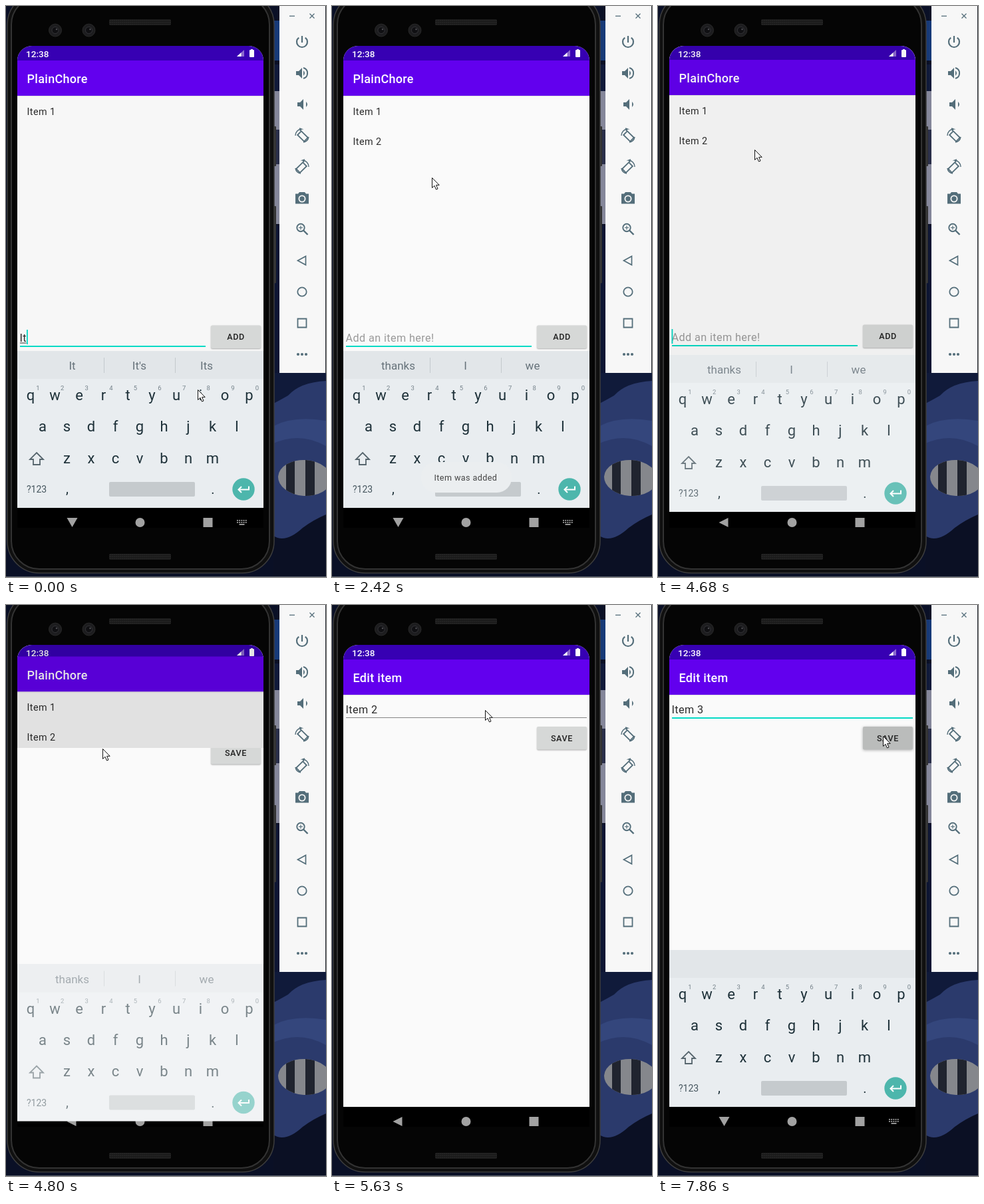
An HTML page with a canvas that plays this animation: 481 by 859 pixels, repeating every 8 s.

```html
<!DOCTYPE html>
<html lang="en">
<head>
<meta charset="utf-8">
<title>Todo app demo</title>
<style>
  html, body { margin: 0; width: 100%; height: 100%; overflow: hidden; background: #0a1026; }
  canvas { display: block; width: 481px; height: 859px; }
</style>
</head>
<body>
<canvas id="stage" width="481" height="859"></canvas>
<script>
const c = document.getElementById('stage').getContext('2d');
const LOOP = 8000;
const TEAL = '#03dac5', SLATE = '#546e7a', PAPER = '#fafafa';

// Stepped tracks: [time, value...], held until the next entry.
const pointer = [
  [0, 288, 577], [820, 300, 560], [940, 325, 521], [1060, 336, 500], [1490, 338, 498],
  [2030, 357, 445], [2160, 290, 372], [2280, 204, 314], [2420, 150, 258], [2540, 108, 222],
  [2660, 82, 204], [2780, 69, 192], [2900, 64, 198], [3050, 67, 202], [3170, 68, 200],
  [3320, 73, 200], [3470, 66, 200], [3890, 110, 208], [4010, 145, 216], [5350, 198, 200],
  [5480, 252, 182], [5630, 230, 158], [5990, 212, 168], [6110, 194, 176],
  [7320, 298, 191], [7470, 335, 196], [7590, 338, 197]
];
const entry = [[0, 'It'], [120, 'Item'], [270, 'Item '], [420, 'Item 2'], [1490, '']];
const edited = [[0, 'Item 2'], [6920, 'Item '], [7040, 'Item 3']];
const hints = [
  [0, 'It', "It's", 'Its'], [120, 'Item', 'Items', 'is'], [270, 'is', 'was', 'I'], [420],
  [1760, 'thanks', 'I', 'we'], [6000], [6920, 'is', 'was', 'I'], [7040]
];
const caret = [[0, 1], [940, 0], [1490, 1], [2030, 0], [2540, 1], [2900, 0], [3470, 1]];
const editCaret = [[0, 0], [5870, 1], [6110, 0], [6920, 1], [7470, 0]];
const toast = [[0, 0], [1760, 0.6], [1880, 1], [3590, 0.95], [3740, 0]];
// Keyboard: shown, offset, fade towards the paper colour.
const keys = [[0, 1, 0, 0], [4680, 1, 6, 0.15], [4800, 1, 21.5, 0.42], [4950, 0, 0, 0],
  [6650, 1, 6, 0.12], [6770, 1, 0, 0]];
// List screen: lower clip edge, shift, shade.
const list = [[0, 755, 0, 0], [4680, 620, -1, 0.04], [4800, 215, -4.5, 0.1], [4950, 0, 0, 0]];
const editShift = [[0, 28], [4800, 22], [4950, 3], [5070, 0]];

function at(track, t) {
  let cur = track[0];
  for (const k of track) if (k[0] <= t) cur = k;
  return cur.slice(1);
}

function box(x, y, w, h, fill) {
  c.fillStyle = fill;
  c.fillRect(x, y, w, h);
}

function round(x, y, w, h, r, fill, line, lw = 1) {
  c.beginPath();
  c.roundRect(x, y, w, h, r);
  if (fill) { c.fillStyle = fill; c.fill(); }
  if (line) { c.strokeStyle = line; c.lineWidth = lw; c.stroke(); }
}

function disc(x, y, r, fill, line, lw = 1) {
  c.beginPath();
  c.arc(x, y, r, 0, Math.PI * 2);
  if (fill) { c.fillStyle = fill; c.fill(); }
  if (line) { c.strokeStyle = line; c.lineWidth = lw; c.stroke(); }
}

function shape(d, x, y, fill, line, lw = 1.8, turn = 0) {
  const p = new Path2D(d);
  c.save();
  c.translate(x, y);
  c.rotate(turn);
  if (fill) { c.fillStyle = fill; c.fill(p); }
  if (line) { c.strokeStyle = line; c.lineWidth = lw; c.stroke(p); }
  c.restore();
}

function text(s, x, y, size, fill, { weight = 400, align = 'left', gap = 0 } = {}) {
  c.font = `${weight} ${size}px Roboto, sans-serif`;
  c.letterSpacing = gap + 'px';
  c.textAlign = align;
  c.fillStyle = fill;
  c.fillText(s, x, y);
  return c.measureText(s).width;
}

function wallpaper() {
  box(0, 0, 481, 859, '#0a1026');
  box(402, 22, 9, 60, '#173a78');
  box(402, 88, 9, 40, '#101a3a');
  box(402, 128, 9, 200, '#85879a');
  box(402, 186, 9, 52, '#2a2f4a');
  box(402, 330, 9, 222, '#0d1533');
  box(402, 552, 79, 307, '#2b3a6c');
  shape('M0 0H79V12Q40 14 22 34Q8 42 0 46Z', 402, 552, '#101a3a');
  shape('M0 0Q30 -16 79 -8V30Q40 8 0 26Z', 402, 632, '#34467c');
  shape('M0 110V48Q18 60 44 36Q60 24 79 16V110Z', 402, 749, '#0b1024');
  c.save();
  c.beginPath();
  c.ellipse(449, 710, 40, 27, 0.06, 0, 7);
  c.clip();
  box(402, 680, 79, 60, '#85878c');
  box(421, 680, 13, 60, '#20242f');
  box(450, 680, 14, 60, '#20242f');
  c.restore();
  box(0, 858, 481, 1, '#555b66');
}

function grille(y) {
  round(155, y, 93, 9, 2, '#1b1b1b');
  for (let i = 0; i < 31; i++)
    for (let j = 0; j < 3; j++) box(156 + i * 3, y + 1 + j * 3, 1, 1, '#3a3a3a');
}

function phone() {
  round(402, 181, 4, 60, 1, '#333');
  round(402, 301, 4, 116, 1, '#333');
  round(2, -20, 401, 873, 48, '#101010', '#3d3d3d', 1.5);
  round(8, -14, 388, 861, 42, '#050505', '#333', 2);
  grille(20);
  grille(824);
  for (const x of [74, 124.5]) {
    disc(x, 36.5, 9.5, '#1d1d1f', '#292929');
    disc(x, 36.5, 5, '#101013', '#343438');
    disc(x + 2, 35, 1.3, '#4b4b50');
  }
  box(17, 755, 370, 30, '#000');
}

function toolbar() {
  box(411, 0, 70, 552, '#f7f7f7');
  box(480, 0, 1, 552, '#20242c');
  box(426, 14.5, 8, 1.3, SLATE);
  shape('M-3.5 -3.5L3.5 3.5M3.5 -3.5L-3.5 3.5', 460, 15, null, SLATE, 1.3);
  const x = 445;
  shape('M0 -9V1M-4.8 -6.4A8 8 0 1 0 4.8 -6.4', x, 54, null, SLATE, 2.2);
  const horn = 'M-9 -3H-5L0 -8V8L-5 3H-9Z';
  shape(horn, x, 101, SLATE);
  shape('M2 -4Q6 0 2 4Z', x, 101, SLATE);
  shape('M2 -8A8.3 8.3 0 0 1 2 8', x, 101, null, SLATE, 2);
  shape(horn, x + 2, 148, SLATE);
  shape('M4 -4Q8 0 4 4Z', x + 2, 148, SLATE);
  for (const [y, s] of [[195, 1], [242, -1]]) {
    c.save();
    c.translate(x, y);
    c.scale(s, 1);
    shape('M-4 -7H4V7H-4Z', 1, 1, null, SLATE, 1.9, -Math.PI / 4);
    shape('M-10 0A10 10 0 0 1 -1 -10L-4 -11M-1 -10L-3 -7M10 2A10 10 0 0 1 2 10', 0, 0, null, SLATE, 1.5);
    c.restore();
  }
  shape('M-4 -9H4L6 -6.5H10V8.5H-10V-6.5H-6Z', x, 289, SLATE);
  disc(x, 290, 4.6, null, '#f7f7f7', 1.8);
  disc(x - 2, 333.5, 5.7, null, SLATE, 1.9);
  shape('M2 2.5L8.5 9', x, 335, null, SLATE, 2.4);
  shape('M-3 0H3M0 -3V3', x - 2, 333.5, null, SLATE, 1.2);
  shape('M-6.5 0L5.5 -6.5V6.5Z', x, 383, null, SLATE, 1.7);
  disc(x, 430, 6.7, null, SLATE, 1.8);
  shape('M-6.5 -6.5H6.5V6.5H-6.5Z', x, 477, null, SLATE, 1.8);
  for (const dx of [-6, 0, 6]) disc(x + dx, 524, 2.1, SLATE);
}

function navBar(withKeys) {
  const g = '#a2a2a2';
  shape(withKeys ? 'M-8 -7H8L0 7Z' : 'M-8 0L6 -7V7Z', 99.5, 777, g);
  disc(201.5, 777, 7, g);
  box(296.5, 770, 14, 14, g);
  if (!withKeys) return;
  for (let i = 0; i < 5; i++)
    for (let j = 0; j < 2; j++) box(347 + i * 3.2, 773 + j * 3, 1.9, 1.8, g);
  box(350.5, 779, 8, 1.8, g);
}

function status() {
  text('12:38', 30, 76.5, 13.6, '#fff', { weight: 500 });
  shape('M0 10L11 0V10Z', 347, 66, '#8b69cf');
  shape('M0 10L6.5 4V10Z', 347, 66, '#fff');
  round(366, 66, 7, 11, 1, '#fff');
  box(368, 65, 3, 1, '#fff');
}

function appBar(title, y) {
  box(17, 82 + y, 370, 53, '#6200ee');
  text(title, 31.5, 116 + y, 18, '#fff', { weight: 500, gap: 0.3 });
  box(17, 135 + y, 370, 1, '#dedee2');
}

function button(label, y, down) {
  c.save();
  c.shadowColor = 'rgba(0,0,0,.3)';
  c.shadowBlur = down ? 4 : 2;
  c.shadowOffsetY = 1;
  round(308, y, 75, 34.5, 2, down ? '#babcbb' : '#d6d8d7');
  c.restore();
  text(label, 345.5, y + 21.7, 12.6, '#222', { weight: 500, align: 'center', gap: 0.6 });
}

function field(s, y) {
  return text(s, 20.5, y, 16.2, '#2a2a2a', { gap: 0.4 });
}

function listScreen(t) {
  const [edge, dy, shade] = at(list, t);
  if (!edge) return;
  c.save();
  c.beginPath();
  c.rect(17, 60, 370, edge - 60);
  c.clip();
  box(17, 60, 370, 695, t < 1640 ? '#f7f7f7' : PAPER);
  box(17, 60, 370, 23, '#3700b3');
  status();
  appBar('PlainChore', dy);
  c.translate(0, dy);
  const item = { gap: 0.4 };
  text('Item 1', 31.5, 163.5, 14.4, '#2a2a2a', item);
  if (t >= 1640) text('Item 2', 31.5, 208.5, 14.4, '#2a2a2a', item);
  const [s] = at(entry, t);
  if (!s) text('Add an item here!', 20.5, 504.5, 16.2, '#9a9a9a', { gap: 0.4 });
  const w = field(s, 504.5);
  if (t < 270) box(21, 506.5, w - 1, 1, '#333');
  box(21, 511, 279, 2, TEAL);
  if (at(caret, t)[0]) box(20.5 + w, 487, 1.8, 22, TEAL);
  button('ADD', 480.5, t >= 1490 && t < 1760);
  c.translate(0, -dy);
  box(17, 60, 370, 695, `rgba(0,0,0,${shade})`);
  c.restore();
}

function editScreen(t) {
  const [dy] = at(editShift, t);
  box(17, 60, 370, 695, PAPER);
  box(17, 60, 370, 23 + dy, '#3700b3');
  status();
  appBar('Edit item', dy);
  c.save();
  c.translate(0, dy);
  const w = field(at(edited, t)[0], 162.5);
  const focus = t >= 5870;
  box(21, 169, 362, focus ? 2 : 1, focus ? TEAL : '#858585');
  if (at(editCaret, t)[0]) box(20.5 + w, 145, 1.8, 22, TEAL);
  if (t >= 6260 && t < 6920) shape('M0 -12L6.5 -6.5A9.3 9.3 0 1 1 -6.5 -6.5Z', 68.5, 180.5, TEAL);
  button('SAVE', 183, t >= 7740);
  c.restore();
}

function keyRow(row, x, y) {
  [...row].forEach((k, i) => text(k, x + i * 36.5, y, 22, '#1d3038', { align: 'center' }));
}

function keyboard(t) {
  const [shown, dy, fade] = at(keys, t);
  if (!shown) return;
  c.save();
  c.translate(0, dy);
  box(17, 519, 370, 236, '#e9edf0');
  box(17, 519, 370, 42, '#e2e6e9');
  const words = at(hints, t);
  words.forEach((s, i) => text(s, 99.5 + i * 101, 547, 17, '#66727a', { align: 'center' }));
  if (words.length) for (const x of [147, 254]) box(x, 529, 1, 23, '#c3c9cd');
  keyRow('qwertyuiop', 37, 593);
  keyRow('asdfghjkl', 55, 640);
  keyRow('zxcvbnm', 91.5, 687.5);
  for (let i = 0; i < 10; i++)
    text((i + 1) % 10, 48 + i * 36.6, 577.5, 9.5, '#75828a', { align: 'center' });
  shape('M0 -9L10 1H5V9H-5V1H-10Z', 46, 681, null, '#56656d', 1.8);
  text('?123', 31, 732, 14, '#46565e');
  text(',', 92, 733, 20, '#1d3038', { align: 'center' });
  text('.', 311, 734, 20, '#1d3038', { align: 'center' });
  round(155, 716, 129, 22, 2, '#c5cacd');
  disc(357, 727, 16.7, '#4db6ac');
  shape('M8 -5V0H-7M-3 -4.5L-7.5 0L-3 4.5', 357, 727.5, null, '#fff', 2);
  c.globalAlpha = fade;
  box(17, 519, 370, 236, PAPER);
  c.restore();
}

function showToast(t) {
  const [a] = at(toast, t);
  if (!a) return;
  c.save();
  c.globalAlpha = a;
  round(134, 686, 136, 46, 22, '#ebeef0');
  text('Item was added', 153.5, 714, 12.6, '#444', { gap: 0.4 });
  c.restore();
}

function draw(t) {
  wallpaper();
  phone();
  toolbar();
  navBar(t < 4680 || t >= 6260);
  c.save();
  c.beginPath();
  c.roundRect(17, 60, 370, 725, [22, 22, 0, 0]);
  c.clip();
  if (t >= 4680) editScreen(t);
  listScreen(t);
  // The leaving keyboard passes beneath the list screen.
  c.save();
  c.beginPath();
  c.rect(17, 216, 370, 569);
  c.clip();
  keyboard(t);
  c.restore();
  showToast(t);
  c.restore();
  const [x, y] = at(pointer, t);
  shape('M.5 .5V15.5L4 12.3L6.5 18L9 17L6.6 11.4H11.2Z', x, y, '#fff', '#111', 1);
}

function tick() {
  draw(performance.now() % LOOP);
  requestAnimationFrame(tick);
}
tick();
</script>
</body>
</html>
```
